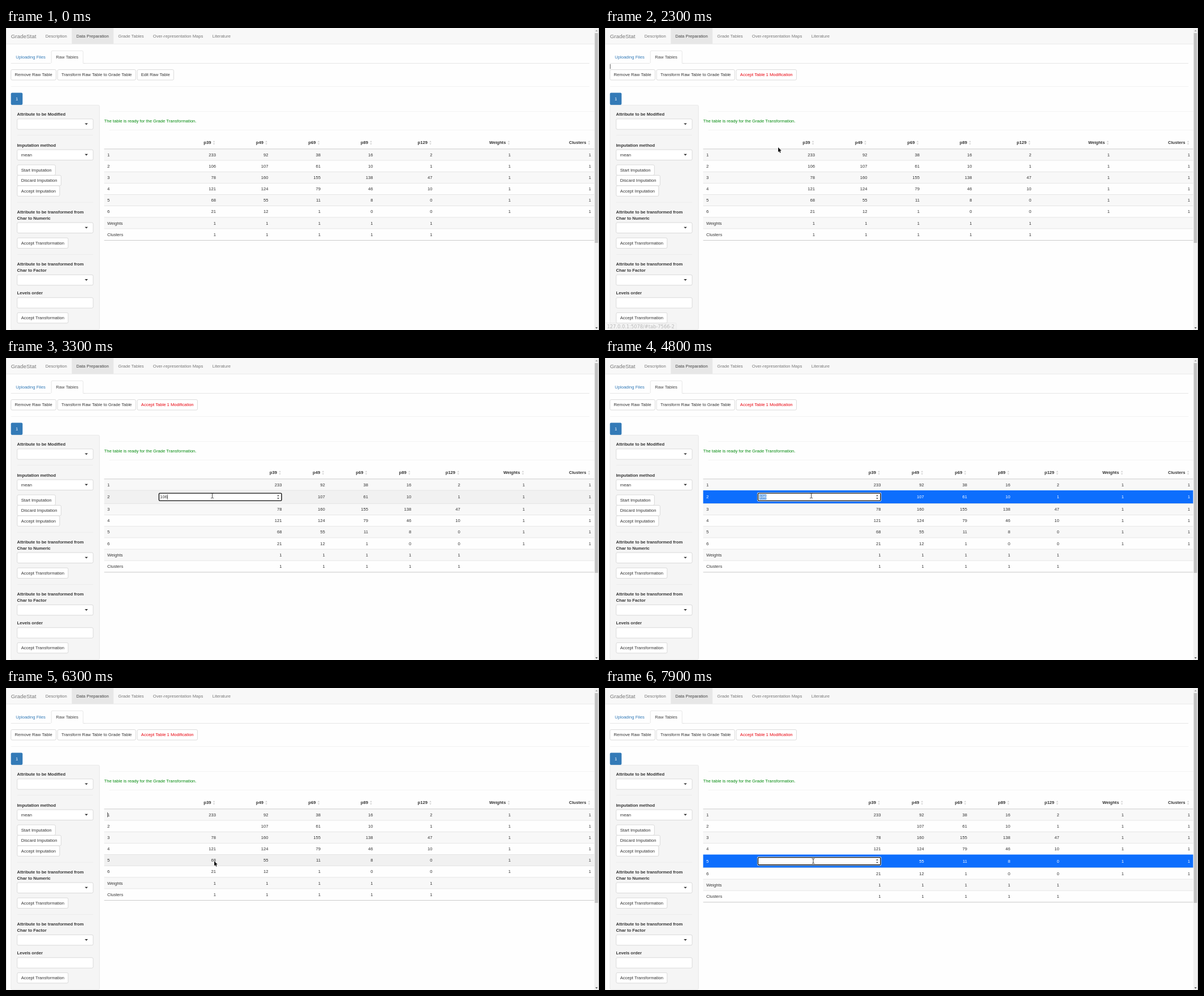
Recreate the animation shown at these times as an HTML page with a canvas. Size 1048 px wide and 534 px high, loop 8 s.

```html
<!DOCTYPE html>
<html lang="en">
<head>
<meta charset="utf-8">
<title>Raw table editing</title>
<style>
html, body { margin: 0; width: 100%; height: 100%; overflow: hidden; background: #fefefe; }
canvas { display: block; width: 1048px; height: 534px; }
</style>
</head>
<body>
<canvas id="stage"></canvas>
<script>
const W = 1048, H = 534, LOOP = 8000, STEP = 100;
const FONT = '"Liberation Sans", Arial, sans-serif';
const SIZE = 7.64;
const canvas = document.getElementById('stage');
const ratio = window.devicePixelRatio || 1;
canvas.width = W * ratio;
canvas.height = H * ratio;
const ctx = canvas.getContext('2d');

const COLUMNS = ['p39', 'p49', 'p69', 'p89', 'p129', 'Weights', 'Clusters'];
const ROWS = [
  ['1', 233, 92, 38, 16, 2, 1, 1],
  ['2', 106, 107, 61, 10, 1, 1, 1],
  ['3', 78, 160, 155, 138, 47, 1, 1],
  ['4', 121, 124, 79, 46, 10, 1, 1],
  ['5', 68, 55, 11, 8, 0, 1, 1],
  ['6', 21, 12, 1, 0, 0, 1, 1],
  ['Weights', 1, 1, 1, 1, 1, '', ''],
  ['Clusters', 1, 1, 1, 1, 1, '', '']
];
const NARROW = [371, 463.5, 556, 648.5, 753.5, 892, 1034];
const WIDE = [487.5, 563.8, 640, 716.3, 802.7, 917, 1034];
const TABLE = { left: 173.5, right: 1039.5, top: 213.9, row: 20.15, tall: 23.4 };

// Each edit: open, select the row and its text, clear, commit.
const EDITS = [
  { row: 1, open: 2900, select: 4400, clear: 5050, commit: 5350 },
  { row: 4, open: 6500, select: 7100, clear: 7350, commit: LOOP }
];
const EDIT_MODE = 1950;

// Pointer path: time, x, y
const PATH = [
  [500, 150, 8], [1000, 112, 50], [1400, 114, 52], [1750, 262, 83],
  [2000, 264, 84], [2300, 306, 211], [2700, 364.5, 243.5], [5200, 364.5, 243.5],
  [5500, 393, 280], [5800, 390, 284], [6300, 368, 306], [LOOP, 368, 306]
];

function text(s, x, y, color = '#333', align = 'left', weight = 'normal', size = SIZE, family = FONT) {
  ctx.font = `${weight} ${size}px ${family}`;
  ctx.fillStyle = color;
  ctx.textAlign = align;
  ctx.fillText(s, x, y + size * 0.35);
}

const bold = (s, x, y, align) => text(s, x, y, '#333', align, 'bold');

function rect(x, y, w, h, color) {
  ctx.fillStyle = color;
  ctx.fillRect(x, y, w, h);
}

const line = (x1, x2, y, color = '#eee', h = 0.7) => rect(x1, y - h / 2, x2 - x1, h, color);

function box(x1, y1, x2, y2, fill, stroke, radius = 2.2, width = 0.7) {
  ctx.beginPath();
  ctx.roundRect(x1, y1, x2 - x1, y2 - y1, radius);
  ctx.fillStyle = fill;
  ctx.fill();
  if (stroke) {
    ctx.strokeStyle = stroke;
    ctx.lineWidth = width;
    ctx.stroke();
  }
}

// Triangle with its base at y; positive h points down.
function triangle(x, y, half, h, color) {
  ctx.fillStyle = color;
  ctx.beginPath();
  ctx.moveTo(x - half, y);
  ctx.lineTo(x + half, y);
  ctx.lineTo(x, y + h);
  ctx.fill();
}

function button(s, x1, x2, y, color = '#333', hover = false) {
  box(x1, y - 9.2, x2, y + 9.2, hover ? '#e6e6e6' : '#fff', hover ? '#adadad' : '#ccc');
  text(s, (x1 + x2) / 2, y, color, 'center');
}

function field(y, value, caret) {
  box(19.7, y - 9.2, 154, y + 9.2, '#fff', '#ccc');
  if (value) text(value, 26.8, y);
  if (caret) triangle(142, y - 1.6, 2.8, 2.9, '#333');
}

function pointerAt(t) {
  if (t < PATH[0][0]) return null;
  const i = PATH.findIndex(p => p[0] > t);
  const a = PATH[i - 1], b = PATH[i];
  const k = (t - a[0]) / (b[0] - a[0]);
  const e = k * k * (3 - 2 * k);
  return { x: a[1] + (b[1] - a[1]) * e, y: a[2] + (b[2] - a[2]) * e };
}

function drawHeader(t, mouse) {
  rect(0, 0, 1040, 28, '#f8f8f8');
  line(0, 1040, 28.2, '#e3e3e3');
  rect(116.3, 0, 73.7, 28, '#e7e7e7');
  text('GradeStat', 8.7, 14.5, '#777', 'left', 'normal', 9.82);
  text('Description', 69.7, 14.7, '#777');
  text('Data Preparation', 124.2, 14.7, '#444');
  text('Grade Tables', 198.3, 14.7, '#777');
  text('Over-representation Maps', 259.8, 14.7, '#777');
  text('Literature', 364.8, 14.7, '#777');

  line(8.7, 1031, 62.4, '#ddd');
  box(80.2, 40.2, 136.3, 66, '#fefefe', '#ddd');
  rect(79, 62.1, 59, 5, '#fefefe');
  line(136, 140, 62.4, '#ddd');
  text('Uploading Files', 17.2, 51, '#337ab7');
  text('Raw Tables', 88.3, 51, '#444');

  button('Remove Raw Table', 8.8, 88.5, 82.8);
  button('Transform Raw Table to Grade Table', 91.2, 229.2, 82.8);
  const over = mouse && mouse.y > 73 && mouse.y < 92 && mouse.x > 232 && mouse.x < 296;
  if (t < EDIT_MODE) button('Edit Raw Table', 232, 296.4, 82.8, '#333', over);
  else button('Accept Table 1 Modification', 232, 338.4, 82.8, '#e8000c', over);
  line(8.7, 1031, 103.5);
  box(8.7, 114.4, 29.3, 136, '#337ab7');
  text('1', 19, 125.3, '#fff', 'center');
}

function drawSidebar() {
  box(8.9, 136.4, 165.3, 533.3, '#f5f5f5', '#e3e3e3');
  for (const y of [189.5, 308.2, 400.3]) line(19.7, 154, y, '#eaeaea');
  bold('Attribute to be Modified', 19.5, 152.5);
  field(170, '', true);
  bold('Imputation method', 19.5, 207);
  field(224.4, 'mean', true);
  button('Start Imputation', 19.9, 87.3, 251.2);
  button('Discard Imputation', 19.9, 97.3, 269.7);
  button('Accept Imputation', 19.9, 94.8, 288.2);
  bold('Attribute to be transformed from', 19.5, 325.2);
  bold('Char to Numeric', 19.5, 336.2);
  field(353.3, '', true);
  button('Accept Transformation', 19.9, 109.8, 380.3);
  bold('Attribute to be transformed from', 19.5, 417.2);
  bold('Char to Factor', 19.5, 428.2);
  field(445.6, '', true);
  bold('Levels order', 19.5, 468.5);
  field(486, '', false);
  button('Accept Transformation', 19.9, 109.8, 512.6);
}

function drawInput(t, edit, y) {
  const selected = t >= edit.select;
  if (selected) box(269, y - 8, 488.4, y + 8, '#fff', null, 2.4);
  box(270.4, y - 6.6, 487, y + 6.6, '#fff', '#101010', 1.6, 1.4);
  const value = t < edit.clear ? String(ROWS[edit.row][1]) : '';
  ctx.font = `${SIZE}px ${FONT}`;
  const w = ctx.measureText(value).width;
  const marked = selected && value;
  if (marked) rect(272.3, y - 4.6, w + 0.3, 9.2, '#6ba5e7');
  text(value, 272.3, y, marked ? '#fff' : '#333');
  const since = t - (value ? edit.open : edit.clear);
  if (!marked && since % 1000 < 500) rect(272.5 + w, y - 4.4, 0.7, 8.8, '#222');
  triangle(481, y - 1.5, 1.9, -2.2, '#444');
  triangle(481, y + 1.5, 1.9, 2.2, '#444');
}

function drawTable(t, mouse) {
  const edit = EDITS.find(e => t >= e.open && t < e.commit);
  const edges = edit ? WIDE : NARROW;
  const { left, right, top, row, tall } = TABLE;
  line(182.5, 1040, 147.8);
  text('The table is ready for the Grade Transformation.', 173.6, 164, '#008a0c');
  line(182.5, 1040, 180.7);

  COLUMNS.forEach((name, i) => {
    bold(name, edges[i] - 8.6, 202.8, 'right');
    triangle(edges[i] - 3.5, 202, 1.8, -3, '#d6d6d6');
    triangle(edges[i] - 3.5, 203.8, 1.8, 3, '#d6d6d6');
  });

  let y = top;
  ROWS.forEach((cells, r) => {
    const editing = edit && edit.row === r;
    const h = editing ? tall : row;
    const mid = y + h / 2;
    const active = editing && t >= edit.select;
    const hover = mouse && r < 6 && mouse.x > left && mouse.y >= y && mouse.y < y + h;
    const back = active ? '#0d6efd' : hover ? '#f1f1f1' : r % 2 ? '#fefefe' : '#f8f8f8';
    const color = active ? '#fff' : '#333';
    rect(left, y, right - left, h, back);
    if (!active) line(left, right, y, r ? '#ddd' : '#ccc', r ? 0.7 : 1);
    text(cells[0], 179, mid, color);
    const emptied = EDITS.some(e => e.row === r && t >= e.commit);
    edges.forEach((x, i) => {
      if (i || !(editing || emptied)) text(String(cells[i + 1]), x, mid, color, 'right');
    });
    if (editing) drawInput(t, edit, mid);
    y += h;
  });
  line(left, right, y + 0.4, '#c4c4c4', 0.9);
}

function drawScrollbar() {
  rect(1039.7, 0, 8.3, H, '#f1f1f1');
  rect(1040.6, 9, 5.7, 371, '#c1c1c1');
  triangle(1043.6, 6, 2.1, -2.4, '#a3a3a3');
  triangle(1043.6, 529.3, 2.1, 2.4, '#505050');
  rect(1047.2, 0, 0.8, H, '#bbb');
  rect(0, 0, 0.7, H, '#ccc');
}

function drawStatus(t) {
  if (t < 1200 || t >= 2400) return;
  ctx.globalAlpha = t < 2200 ? 1 : t < 2300 ? 0.7 : 0.4;
  box(-3, 521.5, 126, 538, '#f0f0f0', '#d0d0d0', 2);
  text('127.0.0.1:5078/#tab-7566-2', 3.5, 528, '#666', 'left', 'normal', 8.3, '"DejaVu Sans", sans-serif');
  ctx.globalAlpha = 1;
}

function drawCarets(t) {
  if (t >= EDIT_MODE && t < EDITS[0].open) rect(8.8, 63.8, 0.8, 8.6, '#333');
  if (t >= EDITS[0].commit && t < EDITS[1].open) rect(179, 219.8, 0.8, 8.6, '#333');
}

function drawPointer(t, mouse) {
  if (!mouse) return;
  ctx.save();
  ctx.translate(mouse.x, mouse.y);
  ctx.beginPath();
  if (EDITS.some(e => t >= e.open && t < e.clear + 150 || e.commit === LOOP && t >= e.open)) {
    ctx.moveTo(-2.4, -4.3);
    ctx.quadraticCurveTo(0, -4.6, 0, -3);
    ctx.quadraticCurveTo(0, -4.6, 2.4, -4.3);
    ctx.moveTo(0, -3.4);
    ctx.lineTo(0, 3.4);
    ctx.moveTo(-2.4, 4.3);
    ctx.quadraticCurveTo(0, 4.6, 0, 3);
    ctx.quadraticCurveTo(0, 4.6, 2.4, 4.3);
    ctx.strokeStyle = '#333';
    ctx.lineWidth = 0.9;
    ctx.stroke();
  } else {
    const tip = [[0, 0], [0, 8.4], [1.9, 6.7], [3.2, 9.7], [4.6, 9.1], [3.3, 6.2], [5.8, 6]];
    tip.forEach(([x, y]) => ctx.lineTo(x, y));
    ctx.closePath();
    ctx.fillStyle = '#111';
    ctx.strokeStyle = '#fff';
    ctx.lineWidth = 1;
    ctx.stroke();
    ctx.fill();
  }
  ctx.restore();
}

function draw(t) {
  const mouse = pointerAt(t);
  ctx.setTransform(ratio, 0, 0, ratio, 0, 0);
  rect(0, 0, W, H, '#fefefe');
  drawHeader(t, mouse);
  drawSidebar();
  drawTable(t, mouse);
  drawScrollbar();
  drawStatus(t);
  drawCarets(t);
  drawPointer(t, mouse);
}

const start = performance.now();
function tick() {
  const t = (performance.now() - start) % LOOP;
  draw(Math.floor(t / STEP) * STEP);
  requestAnimationFrame(tick);
}
tick();
</script>
</body>
</html>
```
